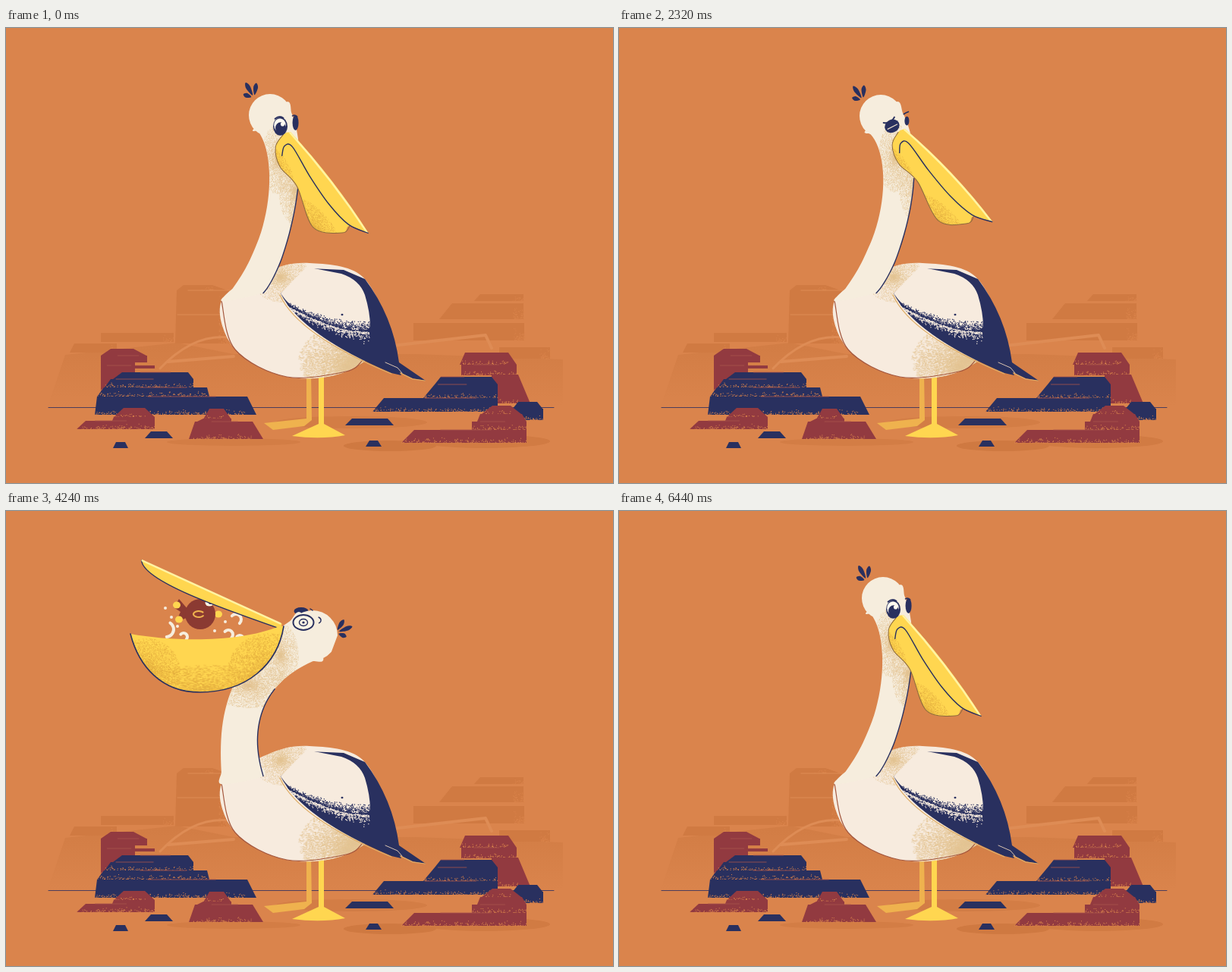
Animation, 800 px wide and 600 px high, one loop 6.96 s. Source, as an HTML page with a canvas:

```html
<!DOCTYPE html>
<html lang="en">
<head>
<meta charset="utf-8">
<title>Pelican</title>
<style>
html, body { margin: 0; width: 100%; height: 100%; overflow: hidden; background: #da844c; }
canvas { display: block; width: 100vw; height: 100vh; }
</style>
</head>
<body>
<canvas id="stage" width="800" height="600"></canvas>
<script>
const LOOP = 6960, RAD = Math.PI / 180;
const BG = '#da844c', FAR = '#d07a42', GLOW = '#de8c55', NAVY = '#29305f', RED = '#923a40';
const CREAM = '#f6eddd', BELLY = '#f7ebde', TAN = '#e3c494', YELLOW = '#ffd650', GOLD = '#e3ad3f';
const PALE = '#fff3a2', FISH = '#8b3a32';
const view = document.getElementById('stage').getContext('2d');
let g = view;

let seed = 7;
const rnd = () => (seed = (seed * 16807) % 2147483647) / 2147483647;
const clamp = v => Math.max(0, Math.min(1, v));
const mix = (a, b, k) => Array.isArray(a) ? a.map((v, i) => mix(v, b[i], k)) : a + (b - a) * k;

// ---------- drawing helpers ----------
function spline(p, closed) {
  const n = p.length / 2, path = new Path2D();
  const at = i => {
    i = closed ? (i + n) % n : Math.max(0, Math.min(n - 1, i));
    return [p[2 * i], p[2 * i + 1]];
  };
  path.moveTo(p[0], p[1]);
  for (let i = 0; i < (closed ? n : n - 1); i++) {
    const a = at(i - 1), b = at(i), c = at(i + 1), d = at(i + 2);
    path.bezierCurveTo(b[0] + (c[0] - a[0]) / 6, b[1] + (c[1] - a[1]) / 6,
      c[0] - (d[0] - b[0]) / 6, c[1] - (d[1] - b[1]) / 6, c[0], c[1]);
  }
  return path;
}
const shape = d => new Path2D(d);
function fill(path, color) { g.fillStyle = color; g.fill(path); }
function line(path, color, width) {
  g.strokeStyle = color; g.lineWidth = width; g.lineCap = g.lineJoin = 'round';
  g.stroke(path);
}
function oval(x, y, rx, ry, color) {
  g.fillStyle = color;
  g.beginPath(); g.ellipse(x, y, rx, ry, 0, 0, 7); g.fill();
}
function arc(x, y, rx, ry, from, to, color, width) {
  const path = new Path2D();
  path.ellipse(x, y, rx, ry, 0, from, to);
  line(path, color, width);
}
function inside(path, draw) { g.save(); g.clip(path); draw(); g.restore(); }
function placed(x, y, sx, deg, draw) {
  g.save(); g.translate(x, y); g.scale(sx, 1); g.rotate(deg * RAD); draw(); g.restore();
}

const clouds = {};
function cloud(color) {
  if (clouds[color]) return clouds[color];
  const c = document.createElement('canvas'), k = c.getContext('2d');
  c.width = c.height = 128;
  k.fillStyle = color;
  for (let i = 0; i < 6500; i++) {
    const a = rnd() * 6.283, r = 63 * rnd();
    k.fillRect(64 + r * Math.cos(a), 64 + r * Math.sin(a), 1, 1);
  }
  return clouds[color] = c;
}
function grain(color, x, y, rx, ry) { g.drawImage(cloud(color), x - rx, y - ry, 2 * rx, 2 * ry); }
function dust(color, x, y, w, h, n) {
  g.fillStyle = color;
  for (let i = 0; i < n; i++) g.fillRect(x + w * rnd(), y + h * Math.max(rnd(), rnd(), rnd()), 1, 1);
}

// a layer of rock: top edge from l to r, sides spreading by sl and sr
function slab(color, l, r, y, h, sl = 0, sr = sl) {
  fill(shape(`M${l} ${y}H${r}L${r + sr} ${y + h}H${l - sl}Z`), color);
  if (color === FAR) return dust(BG, r - 14, y, 15, h, h * 3);
  if (h > 10) dust(BG, l - sl, y + h - 8, r - l + sl, 8, (r - l) * 1.2);
  if (r - l > 60) {
    const x = l + (r - l) * 0.4 * rnd();
    line(shape(`M${x} ${y}H${x + (r - l) * 0.45}`), '#a85549', 0.8);
  }
}

// ---------- static scene ----------
function scenery() {
  g.fillStyle = BG;
  g.fillRect(0, 0, 800, 600);
  const haze = g.createLinearGradient(0, 420, 0, 500);
  haze.addColorStop(0, '#d27d45'); haze.addColorStop(1, BG);
  fill(shape('M78 431L225 415 300 430H540L734 437V499H55Z'), haze);
  slab(FAR, 234, 272, 339, 7, 9, 20);
  slab(FAR, 225, 294, 346, 70, 2);
  slab(FAR, 125, 221, 402, 12);
  slab(FAR, 90, 146, 416, 12, 6, 0);
  slab(FAR, 625, 682, 351, 9, 8, 0);
  slab(FAR, 588, 682, 363, 21, 17, 0);
  slab(FAR, 537, 683, 389, 23);
  slab(FAR, 650, 717, 421, 15);
  line(shape('M203 449Q250 400 300 409'), GLOW, 3);
  line(shape('M214 440L300 433M500 420L632 405 640 422'), GLOW, 4);
  line(shape('M226 378H290M240 346H296'), GLOW, 1);
  oval(300, 546, 88, 5, '#d37d45');
  oval(630, 545, 87, 9, '#d17b43');
  oval(506, 551, 61, 7, '#cf7941');
  oval(455, 520, 100, 8, '#d37d45');
  line(shape('M56 500.5H722'), '#4b3d5c', 1);

  slab(RED, 138, 168, 423, 9, 13, 17);
  slab(RED, 125, 186, 432, 9);
  slab(RED, 125, 170, 441, 40);
  slab(RED, 126, 196, 445, 4);
  slab(NAVY, 153, 240, 454, 9, 12, 7);
  slab(NAVY, 138, 247, 463, 11, 8, 0);
  slab(NAVY, 129, 265, 474, 12, 9, 3);
  slab(NAVY, 120, 318, 486, 24, 3, 12);
  slab(RED, 155, 183, 501, 12, 13);
  slab(RED, 142, 196, 513, 5, 2, 0);
  slab(RED, 105, 196, 518, 11, 12, 0);
  slab(RED, 268, 287, 502, 14, 8, 10);
  slab(RED, 260, 297, 515, 5, 10, 0);
  slab(RED, 249, 325, 519, 23, 8, 14);
  slab(NAVY, 191, 212, 532, 9, 8);
  slab(NAVY, 145, 157, 546, 8, 4);

  slab(RED, 605, 662, 428, 16, 7, 11);
  slab(RED, 600, 673, 444, 14);
  slab(RED, 640, 675, 457, 38, 0, 16);
  slab(NAVY, 573, 640, 460, 10, 8);
  slab(NAVY, 565, 648, 470, 18, 15, 0);
  slab(NAVY, 498, 648, 488, 18, 15, 0);
  slab(NAVY, 675, 700, 493, 10, 8);
  slab(NAVY, 669, 708, 502, 15, -12, 0);
  slab(RED, 641, 665, 498, 11, 14);
  slab(RED, 625, 680, 509, 10, 4, 6);
  slab(RED, 614, 686, 519, 11);
  slab(RED, 538, 686, 530, 17, 17, 0);
  slab(NAVY, 456, 503, 515, 9, 9, 8);
  slab(NAVY, 479, 490, 544, 8, 5);

  // legs
  fill(shape('M396 455H402L403 517 393 525 352 530 340 521 396 515Z'), '#efb24e');
  fill(shape('M412 455H419V522L447 537Q415 543 377 538L412 522Z'), YELLOW);

  // body
  const body = spline([284, 360, 302, 424, 370, 460, 448, 453, 500, 405, 470, 328, 400, 310, 345, 321], true);
  fill(body, BELLY);
  inside(body, () => {
    grain(TAN, 458, 438, 74, 50);
    grain(TAN, 450, 446, 60, 34);
    grain(TAN, 362, 328, 38, 34);
  });
  line(spline([284, 360, 302, 424, 370, 460, 448, 453, 470, 438]), '#a4583f', 1.2);

  // wing
  const wing = shape('M400 317L445 319 473 331Q510 380 518 441L553 465 536 462 519 454 521 458 508 455Q390 405 362 350Z');
  fill(wing, NAVY);
  fill(shape('M396 315L442 324Q466 332 473 352 480 375 480 394 470 408 430 391 385 384 362 350Z'), BELLY);
  inside(wing, () => {
    for (let i = 0; i < 1500; i++) {
      const k = rnd(), side = rnd() < 0.6, off = 12 * rnd() * rnd() * (0.4 + k);
      g.fillStyle = side ? NAVY : BELLY;
      g.fillRect(366 + 113 * k, 364 + 36 * Math.sin(k * 1.6) + (side ? -off : off), 1.2, 1.2);
    }
  });
  oval(443, 378, 1.5, 1.2, NAVY);
  line(shape('M361 352Q385 405 508 456M520 455L536 463 552 465'), '#dfae68', 1.2);
  line(shape('M500 441L516 448 522 455'), '#d9c3b0', 1);
}
const back = document.createElement('canvas');
back.width = 800; back.height = 600;
g = back.getContext('2d');
scenery();
g = view;

// ---------- poses: two neck handles, head, bill root, bill angle, neck half width ----------
const A = [364, 298, 385, 160, 348, 115, 375, 137, 52.4, 17];
const B = [350, 310, 341, 200, 343, 132, 367, 165, 74.6, 21];
const C = [364, 298, 391, 165, 345, 116, 377, 133, 46.7, 18];
const F = [364, 298, 393, 168, 338, 117, 372, 131, 42.8, 18];
const D = [296, 270, 320, 205, 404, 164, 362, 152, 12, 23];
const lean = (p, dx, dy, turn = 0) =>
  p.map((v, i) => i > 8 ? v : i === 8 ? v + turn : v + (i % 2 ? dy : dx) * [0.1, 0.6, 1, 1][i >> 1]);

const HELD = lean(C, -1, 2, 1);
const POSE = [[0, A], [560, A], [1200, lean(B, -2, 3, 1)], [1280, B], [2000, B], [2320, C], [2400, lean(C, 2, -1, -1)],
  [2560, HELD], [3440, HELD], [3520, F], [3600, lean(F, 3, 2, -1)], [4000, lean(D, -3, 2)], [4160, D], [4240, D],
  [4440, lean(D, 58, 8)], [4560, lean(D, 50, 6)], [4800, lean(D, -2, 1)], [4920, D], [5760, D],
  [6240, lean(A, 6, -3, -5)], [6440, A]];
const YAW = [[0, 1], [3600, 1], [3920, -1], [5840, -1], [6160, 1]];
const OPEN = [[3680, 5], [4000, 48], [4160, 43.6], [4240, 25.4], [4360, -3], [4600, -3], [4800, 48],
  [4920, 43.6], [5760, 43.6], [5840, 46], [6040, 0]];
const LEAP = [[4080, 0], [4240, 1], [4280, 0.9], [4400, 0], [4960, 0], [5280, 1.1], [5640, 0]];
const BROW = [[200, 0], [320, 1], [640, 1], [800, 0]];

function track(keys, t) {
  let i = 1;
  while (i < keys.length - 1 && keys[i][0] < t) i++;
  const [t0, a] = keys[i - 1], [t1, b] = keys[i], k = clamp((t - t0) / (t1 - t0));
  return mix(a, b, k * k * (3 - 2 * k));
}

// ---------- bird parts ----------
// ribbon around a cubic curve from the breast to the head
function neck([ax, ay, bx, by, hx, hy, , , , thin], r) {
  const left = [], right = [];
  const cubic = (a, b, c, d, t) => {
    const s = 1 - t;
    return a * s * s * s + 3 * b * s * s * t + 3 * c * s * t * t + d * t * t * t;
  };
  const at = t => [cubic(312, ax, bx, hx, t), cubic(355, ay, by, hy, t)];
  for (let i = 0; i <= 16; i++) {
    const t = i / 16, [x, y] = at(t), [x0, y0] = at(t - 0.01), [x1, y1] = at(t + 0.01);
    const len = Math.hypot(x1 - x0, y1 - y0), k = Math.min(1, 4 * t);
    const nx = mix(1, (y0 - y1) / len, k), ny = mix(-0.2, (x1 - x0) / len, k);
    const w = thin + (r - 1 - thin) * t ** 3 + (27 - thin) * (1 - t) ** 6;
    left.unshift(x - nx * w, y - ny * w);
    right.push(x + nx * w, y + ny * w);
  }
  const path = spline([...right, ...left], true);
  const edge = spline(right.slice(0, 22));
  path.moveTo(hx + r, hy);
  path.arc(hx, hy, r, 0, 7, true);
  return { path, edge };
}

function crest(deg) {
  const x = 31 * Math.cos((deg + 175) * RAD), y = 31 * Math.sin((deg + 175) * RAD);
  [[-42, 15], [0, 23], [38, 20]].forEach(([turn, len]) => placed(x, y, 1, deg + 188 + turn, () =>
    fill(spline([4, 0, len * 0.7, -3, len, 0, len * 0.7, 3], true), NAVY)));
}

function closedBill(x, y, deg, yaw) {
  const wide = 1 + (deg - 52) / 150, bulge = (deg - 75) / 6;
  const swell = p => spline(p.map((v, i) => i % 2 ? v * wide : v));
  const lower = [146, 14, 147, 27, 118, 53, 62, 37, 28, 39, 4, 28, -3, 10];
  const path = swell([169, 0, ...lower, 0, 0]);
  path.quadraticCurveTo(85, 2 * bulge, 169, 0);
  placed(x, y, Math.max(0.05, yaw), deg, () => {
    fill(path, YELLOW);
    inside(path, () => {
      grain(GOLD, 122, 56, 52, 26);
      grain(GOLD, 20, 42, 36, 15);
      line(shape(`M0 1Q85 ${2 * bulge + 2} 168 1`), PALE, 2.6);
    });
    line(swell(lower), '#8d6a3c', 1);
    line(swell([18, 28, 10, 18, 17, 10, 61, 15.5, 106, 18, 143, 14, 168, 0.5]), NAVY, 1.4);
  });
}

function fish(rise) {
  if (rise < 0.02) return;
  placed(256, 136 + (1 - rise) * 76, 1, 0, () => {
    fill(shape('M-16 -6L-28 -20-35 -9-26 -3-32 10-15 4Z'), FISH);
    [[-31, -12], [-28, 7], [24, 0]].forEach(([x, y]) => oval(x, y, 5, 4.5, YELLOW));
    oval(0, 0, 20, 20, FISH);
    arc(-2, 0, 7, 4, 0.6, 5.6, '#efb24e', 2.2);
    oval(12, -15, 5.5, 4.5, '#fff6e4');
    oval(13, -15, 2, 2, NAVY);
  });
  // splash grows out of the pouch
  g.save();
  g.translate(0, 168);
  g.scale(1, Math.min(1, rise));
  [[211, -12, 10], [234, -2, 5], [293, -5, 6], [303, -25, 7], [308, 1, 5]].forEach(([x, y, r], i) =>
    arc(x, y, r, r, i === 0 ? -1 : -2.4, i === 0 ? 1.5 : 0.8, CREAM, 4));
  for (let i = 0; i < 6; i++) oval(i % 2 ? 310 - 7 * i : 210 + 4 * i, -40 + 6 * i, 2, 2, CREAM);
  g.restore();
}

function openBill(x, y, yaw, open, rise) {
  g.save();
  g.translate(x, y);
  g.scale(Math.max(0.05, -yaw), 1);
  g.translate(-362, -152);
  fish(rise);
  placed(362, 152, -1, -open, () => {
    const under = 'M-2 3C80 12 190 24 203 0';
    fill(shape(under + 'L0 -4Z'), YELLOW);
    line(shape(under), NAVY, 1.4);
    line(shape('M2 -3L202 0'), PALE, 2.4);
  });
  const bowl = 'M366 152C358 202 318 239 255 239 205 239 175 205 164 162';
  const pouch = shape(bowl + 'C225 173 310 173 360 152Z');
  fill(pouch, YELLOW);
  inside(pouch, () => {
    grain(GOLD, 262, 244, 110, 42);
    grain(GOLD, 345, 215, 55, 55);
    grain(GOLD, 185, 212, 45, 45);
  });
  line(shape(bowl), NAVY, 1.6);
  g.restore();
}

function eyes(deg, squint, brow) {
  const polar = (d, a) => [d * Math.cos(a * RAD), d * Math.sin(a * RAD)];
  const [x, y] = polar(20, deg - 5), [fx, fy] = polar(35, deg - 36);
  const up = 5 * brow;
  placed(x, y, 1, squint ? deg - 74 : 0, () => {
    if (squint) {
      oval(0, 0, 10, 8.5, NAVY);
      line(shape('M-7 1H7'), '#e9dcc9', 1.2);
      line(shape('M-8 -9Q0 -3 8 -9'), NAVY, 2);
    } else {
      oval(0, 0, 9.5, 12, NAVY);
      oval(-0.5, -1.5, 7.8, 9, '#fffaf0');
      oval(0.5, 2, 7, 7.5, NAVY);
      oval(3, -3 - brow, 2.6, 2.8, '#fffaf0');
      line(shape(`M-7 ${-10 - up}Q-1 ${-15 - up} 4 ${-11 - up}`), NAVY, 1.8);
    }
  });
  oval(fx, fy, squint ? 3 : 4, squint ? 6 : 10, NAVY);
  line(shape(`M${fx - 4} ${fy - 9 - up}q3 -2 6 ${squint ? -3 : 1}`), NAVY, 1.7);
}

function wideEye() {
  oval(12, -17, 13.5, 10, '#fbf4e4');
  arc(12, -17, 13.5, 10, 0, 7, NAVY, 2);
  arc(12, -17, 5.5, 4.5, 0, 7, NAVY, 1.4);
  oval(12, -17, 1.7, 1.5, NAVY);
  arc(-7, -20, 4, 4, 2, 4.4, NAVY, 1.6);
  line(shape('M3 -35L0 -33'), NAVY, 1.5);
}

function draw(ms) {
  const t = ms % LOOP, step = t < 4240 ? 80 : 40, s = Math.floor(t / step) * step;
  const yaw = track(YAW, s), turned = yaw < 0;
  let p = track(POSE, s);
  const nibbling = s > 1280 && s <= 2000;
  if (nibbling && s / 80 % 2 === 0) p = lean(p, 2, -2, -2);
  const [hx, hy, bx, by, deg] = p.slice(4);
  const squint = (s >= 880 && s < 2480) || t >= 3000;

  g.drawImage(back, 0, 0);
  placed(hx, hy, yaw, 0, () => {
    crest(deg);
    if (turned) oval(15, -32, 9.5, 5, NAVY);
  });
  const { path, edge } = neck(p, 30.5 - 2.5 * yaw);
  fill(path, CREAM);
  inside(path, () => {
    if (turned) {
      grain(TAN, bx - 42, by + 78, 58, 30);
      grain(TAN, bx, by + 38, 24, 42);
    } else {
      [[18, 36], [64, 42], [96, 50]].forEach(([u, v]) => {
        const c = Math.cos(deg * RAD), n = Math.sin(deg * RAD);
        grain(TAN, bx + u * c - v * n, by + u * n + v * c, 22, 46);
      });
    }
  });
  line(edge, NAVY, 1.4);
  if (turned) {
    openBill(bx, by, yaw, track(OPEN, s), track(LEAP, s));
    placed(hx, hy, -yaw, 0, () => placed(0, 0, -1, 0, wideEye));
  } else {
    closedBill(bx, by, deg, yaw);
    placed(hx, hy, yaw, 0, () => eyes(deg, squint && s < 5000, track(BROW, s)));
  }
  // feathers ruffled by the bill
  if (nibbling) line(shape('M390 323L395 325 393 329M396 321L402 323 411 318'), NAVY, 1.2);
}

const start = performance.now();
function tick(now) {
  draw(Math.max(0, now - start));
  requestAnimationFrame(tick);
}
draw(0);
requestAnimationFrame(tick);
</script>
</body>
</html>
```
